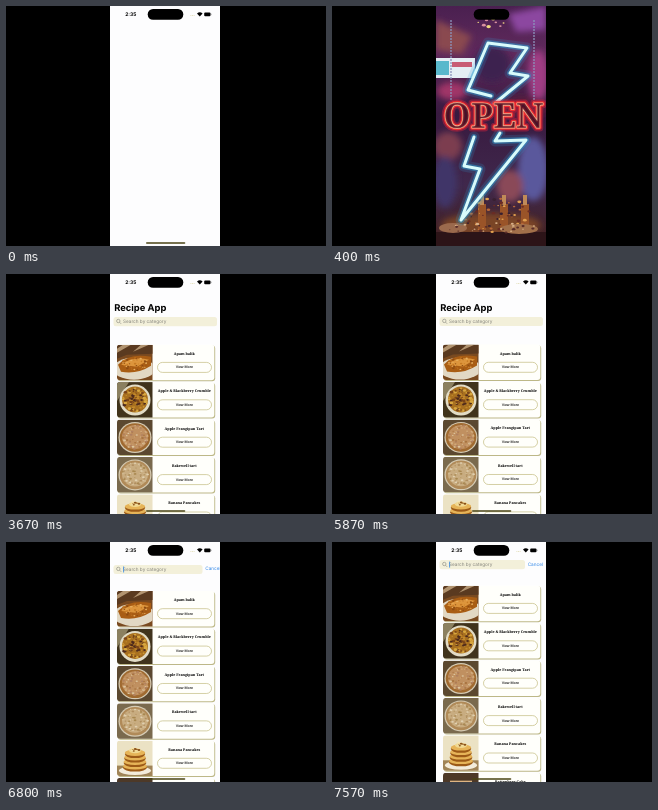
Recreate the animation shown at these times as an HTML page. Size 320 by 240 pixels, loop 8 s.

```html
<!DOCTYPE html>
<html lang="en">
<head>
<meta charset="utf-8">
<title>Recipe App</title>
<style>
  html, body { margin: 0; width: 100%; height: 100%; overflow: hidden; background: #000; }
  svg { display: block; width: 100%; height: 100%; text-rendering: geometricPrecision; }
  text { dominant-baseline: central; font-family: Inter, sans-serif; }
  .dish { font: 700 3.65px "Noto Serif", serif; text-anchor: middle; }
  .more { font-size: 3.4px; font-weight: 500; text-anchor: middle; }
  .sign { font: 700 35px "Noto Serif", serif; text-anchor: middle; }
  .neon { fill: none; stroke-linejoin: round; stroke-linecap: round; }
</style>
</head>
<body>
<svg viewBox="0 0 320 240">
  <defs>
    <clipPath id="screen"><path d="M104 0h110v240h-110z"/></clipPath>
    <clipPath id="thumb"><path d="M35.5 0H3a3 3 0 0 0-3 3v29.5a3 3 0 0 0 3 3h32.5z"/></clipPath>
    <linearGradient id="bar" x2="0" y2="1">
      <stop stop-color="#4a2050"/>
      <stop offset=".2" stop-color="#602a5c"/>
      <stop offset=".45" stop-color="#381a40"/>
      <stop offset=".75" stop-color="#40284c"/>
      <stop offset="1" stop-color="#42201c"/>
    </linearGradient>
    <filter id="soft" x="-50%" y="-50%" width="200%" height="200%"><feGaussianBlur stdDeviation="3"/></filter>
  </defs>
  <g clip-path="url(#screen)">
    <path d="M104 0h110v240h-110z" fill="#fdfdfe"/>
    <g id="app">
      <text id="title" x="108.2" y="34.8" font-size="9.4" font-weight="700">Recipe App</text>
      <g id="list"></g>
      <g id="search">
        <rect id="field" x="107.5" y="43" height="9.2" rx="2.5" fill="#f3f0da"/>
        <g fill="none" stroke="#85857c" stroke-width=".6">
          <circle cx="112.3" cy="47" r="1.7"/><path d="M113.6 48.3l1.6 1.6"/>
        </g>
        <text x="117" y="47.9" font-size="4.7" fill="#85847c">Search by category</text>
        <path id="caret" d="M117.6 44.6v6" stroke="#2f86e8" stroke-width=".8"/>
        <text id="cancel" y="47.6" font-size="4.7" fill="#2f86e8">Cancel</text>
      </g>
    </g>
    <g id="status">
      <text x="119.2" y="8.7" font-size="5" font-weight="700">2:35</text>
      <path d="M184.5 9.5h4" stroke="#d8d4a0" stroke-width=".8" stroke-dasharray=".8"/>
      <path d="M191 7.4q2.8-2.2 5.6 0l-2.8 3z"/>
      <rect x="198.2" y="6.6" width="6.3" height="3.7" rx="1"/>
      <path d="M205 7.7v1.4" stroke="#555" stroke-width=".6"/>
    </g>
    <g id="splash"></g>
    <rect x="141.7" y="3" width="35.6" height="10.7" rx="5.3"/>
    <rect id="home" x="140" y="236.2" width="39.3" height="1.6" rx=".8" fill="#4a4414"/>
  </g>
</svg>
<script>
const LOOP = 8000;
const ROW = 37.4;
const $ = id => document.getElementById(id);
const clamp = v => Math.max(0, Math.min(1, v));
const ramp = (t, from, to) => clamp((t - from) / (to - from));
const ellipse = (x, y, rx, ry, fill) => `<ellipse cx="${x}" cy="${y}" rx="${rx}" ry="${ry}" fill="${fill}"/>`;
const rect = (x, y, w, h, fill) => `<rect x="${x}" y="${y}" width="${w}" height="${h}" fill="${fill}"/>`;
const path = (d, fill) => `<path d="${d}" fill="${fill}"/>`;

let seed = 7;
const random = () => (seed = seed * 16807 % 2147483647) / 2147483647;

// Small spots scattered evenly inside an ellipse.
function speckle(count, x, y, rx, ry, size, colors) {
  return Array.from({ length: count }, (_, i) => {
    const angle = i * 2.4, reach = Math.sqrt(random());
    const spot = size * (.5 + random());
    return ellipse(x + Math.cos(angle) * reach * rx, y + Math.sin(angle) * reach * ry,
      spot, spot * .7, colors[i % colors.length]);
  }).join('');
}

const tart = (back, crust, top, spots) =>
  rect(0, 0, 36, 36, back) + ellipse(18, 18, 16.5, 15.5, '#d5cbb4') +
  ellipse(18, 18, 15.3, 14.3, crust) + ellipse(18, 17.5, 13, 12, top) +
  speckle(70, 18, 17.5, 13, 12, 1, spots);

const pancakes = [0, 1, 2, 3].map(i =>
  ellipse(18, 27 - i * 4.5, 12 - i * .6, 4, '#9c5a17') +
  ellipse(18, 25.6 - i * 4.5, 12 - i * .6, 3.2, '#e6b458')).join('');

const dishes = [
  ['Apam balik', rect(0, 0, 36, 36, '#7a4a20') + path('M0 0h36v9L10 10 0 14z', '#5a3a20') +
    path('M6 0h8L0 8V4zM24 0h8L16 7z', '#b29470') + ellipse(17, 24, 21, 11, '#e2d8c4') +
    path('M1 20Q12 8 34 12L34 21Q20 30 4 27z', '#a95d14') +
    path('M4 20Q15 11 32 15L20 22z', '#dd953c') +
    speckle(40, 18, 19, 14, 6, .9, ['#c77a22', '#e8b060', '#8c4a10'])],
  ['Apple &amp; Blackberry Crumble', rect(0, 0, 36, 36, '#40331c') + path('M0 0h12L0 19z', '#8b8060') +
    ellipse(18, 18, 15.5, 15.5, '#e2dcc6') + ellipse(18, 17.5, 13, 13, '#a8701f') +
    speckle(80, 18, 17.5, 12, 12, 1.3, ['#d8a840', '#7a4418', '#c48a2c', '#4e2a1c'])],
  ['Apple Frangipan Tart', tart('#5b4830', '#a06a30', '#c09060', ['#dcc6a0', '#a87440', '#d0a878', '#b08060'])],
  ['Bakewell tart', tart('#7a6a4e', '#b08a58', '#c8ac80', ['#e0d0b0', '#b08e60', '#d0b890', '#a88850'])],
  ['Banana Pancakes', rect(0, 0, 36, 36, '#ebe2c4') + rect(0, 25, 36, 11, '#a08458') +
    ellipse(18, 30, 16, 4.5, '#f3ecdb') + pancakes + ellipse(18, 10, 6, 2.6, '#f1d991') +
    speckle(9, 18, 9, 6, 2, 1, ['#8a5018', '#f6e6b0'])],
  ['Battenberg Cake', rect(0, 0, 36, 36, '#4d3928') + rect(7, 8, 22, 22, '#dfb582')],
];

$('list').innerHTML = dishes.map(([name, picture], i) => `
  <g transform="translate(111 ${70.7 + i * ROW})">
    <rect x=".7" y=".9" width="97.5" height="35.6" rx="3" fill="#bdb887"/>
    <rect width="97.3" height="35.5" rx="3" fill="#fffffb"/>
    <g clip-path="url(#thumb)">${picture}</g>
    <text class="dish" x="67.3" y="9.5">${name}</text>
    <rect x="40.5" y="17.7" width="54" height="10" rx="5" fill="none" stroke="#b9b16c" stroke-width=".6"/>
    <text class="more" x="67.3" y="22.7">View More</text>
  </g>`).join('');

const neon = (d, glow, core) =>
  [[11, .18, glow], [6, .5, glow], [3, 1, core]].map(([width, opacity, color]) =>
    `<path class="neon" d="${d}" stroke="${color}" stroke-width="${width}" opacity="${opacity}"/>`).join('');

const bolts = 'M159 90L136 84 156 37 195 42 178 67 196 70 162 98' +
  'M142 131L132 160 148 163 129 214 194 134 163 135 168 127';

const openSign = [[7, .35, '#ff2038'], [3.6, 1, '#ee2c30'], [1.1, 1, '#ffc09a']].map(([width, opacity, color]) =>
  `<text class="sign" x="161.5" y="109.5" fill="#3c1024" fill-opacity=".5" paint-order="stroke"
    stroke="${color}" stroke-width="${width}" stroke-linejoin="round" opacity="${opacity}">OPEN</text>`).join('');

$('splash').innerHTML = rect(104, 0, 110, 240, 'url(#bar)') +
  '<g filter="url(#soft)">' +
    path('M104 14L140 30 130 48 104 44z', '#8a4a50') + path('M176 8L214 0V24L184 26z', '#8c46a0') +
    ellipse(206, 70, 10, 26, '#a03c84') + ellipse(120, 85, 15, 9, '#a03468') +
    ellipse(160, 58, 18, 18, '#3c2050') + ellipse(192, 102, 24, 12, '#5a1c3c') +
    ellipse(116, 140, 14, 14, '#7c3c50') + ellipse(113, 176, 12, 26, '#403468') +
    ellipse(201, 163, 15, 32, '#5a589c') + ellipse(178, 180, 13, 16, '#8a4858') +
    ellipse(159, 219, 50, 12, '#7a4428') +
  '</g>' +
  speckle(8, 160, 17, 14, 4, 1.6, ['#f0d880', '#d890a0']) +
  rect(104, 52, 39, 20, '#e4eef4') + rect(104, 55, 13, 14, '#58b8cc') + rect(120, 56, 20, 5, '#c85c74') +
  '<path d="M119 14v81M202 14v82" stroke="#8c94bc" stroke-width="1.3" stroke-dasharray="2 1"/>' +
  path('M104 226h110v14h-110z', '#2c1418') +
  [146, 168, 189].map(x => rect(x, 198, 8, 26, '#9a5428') + rect(x + 2, 189, 4, 10, '#c08a58')).join('') +
  speckle(60, 166, 209, 34, 18, 1.3, ['#e0a050', '#6a2c24', '#b86838', '#382030']) +
  ellipse(121, 222, 14, 5, '#9b6a4d') + ellipse(187, 223, 19, 5, '#a2704a') +
  speckle(30, 160, 222, 50, 5, 1.2, ['#d8b088', '#5a2c28']) +
  neon(bolts, '#2c9cd0', '#d8fbfb') + openSign;

const springCurve = x => 1 - (1 + x) * Math.exp(-x);
const focusAmount = t => springCurve(5.1 * ramp(t, 5840, 7570)) / springCurve(5.1);

function draw(t) {
  const splash = t < 2770 ? ramp(t, 0, 400) : 0;
  const focus = focusAmount(t);
  const show = (id, opacity) => $(id).setAttribute('opacity', opacity);
  const shift = (id, y) => $(id).setAttribute('transform', `translate(0 ${y})`);

  show('splash', t < 30 ? 0 : splash);
  show('home', t < 2770 ? 1 - splash : 1);
  show('app', t < 2770 ? 0 : 1);
  show('list', ramp(t, 3370, 3670));
  show('title', 1 - clamp(focus / .5));
  show('caret', ramp(focus, .3, .6));
  show('cancel', clamp(focus * 2));
  shift('title', -25 * focus);
  shift('search', -25 * focus);
  shift('list', -27 * focus);
  $('field').setAttribute('width', 103.5 - 18 * focus);
  $('cancel').setAttribute('x', 214 - 18.3 * focus);
}

const start = performance.now();
function tick() {
  draw((performance.now() - start) % LOOP);
  requestAnimationFrame(tick);
}
tick();
</script>
</body>
</html>
```
